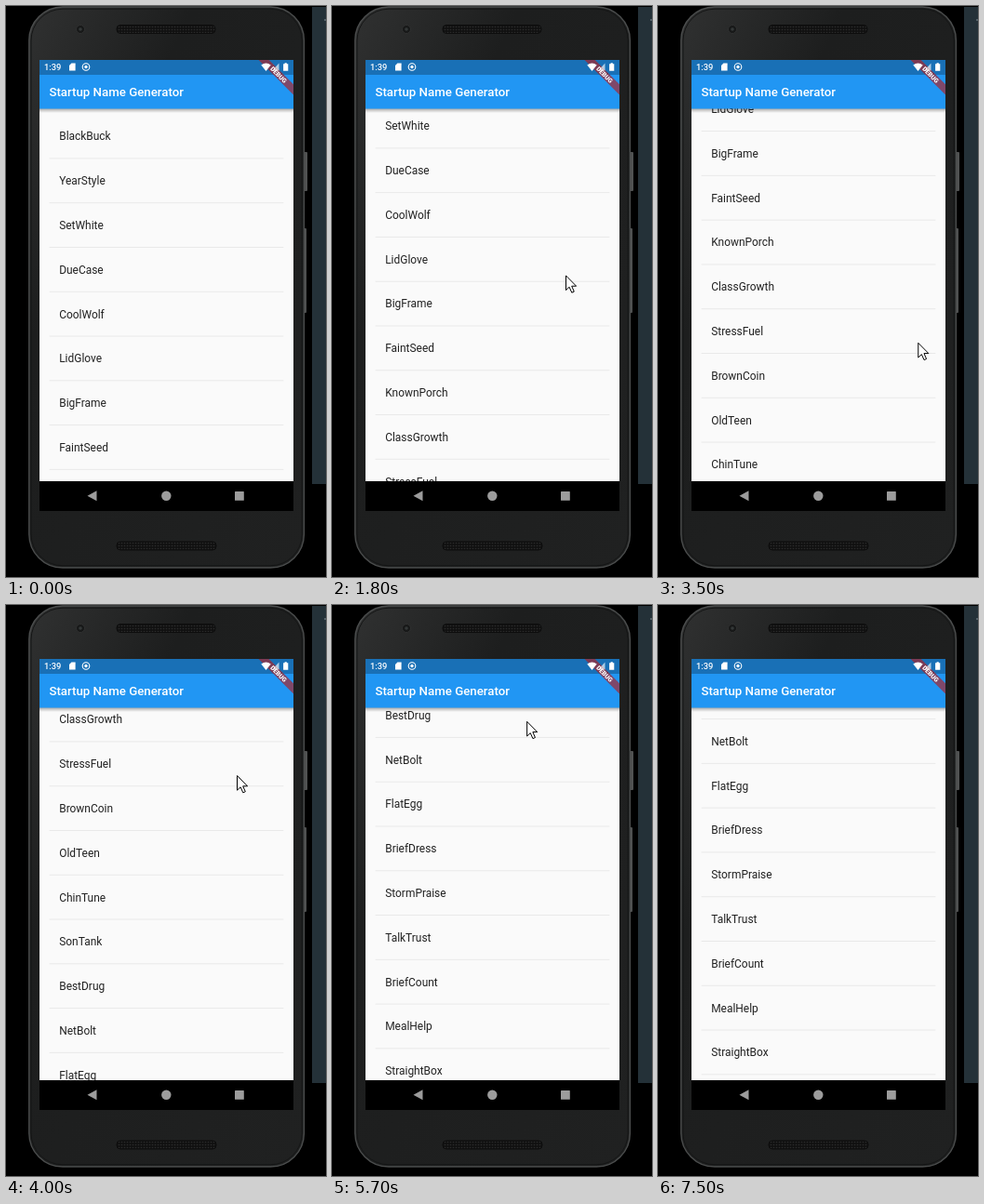
Animation of 344x614 px, one loop 7700 ms. Source, as an HTML page:

```html
<!DOCTYPE html>
<html lang="en">
<head>
<meta charset="utf-8">
<style>
html, body { margin: 0; width: 100%; height: 100%; overflow: hidden; background: #000; }
svg { display: block; font-family: Roboto, sans-serif; }
</style>
</head>
<body>
<svg width="344" height="614" viewBox="0 0 344 614">
  <defs>
    <linearGradient id="shell" x2="1" y2="1">
      <stop offset="0" stop-color="#303131"/>
      <stop offset=".3" stop-color="#1d1e1e"/>
      <stop offset="1" stop-color="#202121"/>
    </linearGradient>
    <linearGradient id="shade" x2="0" y2="1">
      <stop offset="0" stop-opacity=".34"/>
      <stop offset="1" stop-opacity="0"/>
    </linearGradient>
    <pattern id="mesh" width="3" height="3" patternUnits="userSpaceOnUse">
      <rect width="3" height="3" fill="#111"/>
      <circle cx="1.5" cy="1.5" r=".8" fill="#2b2b2b"/>
    </pattern>
    <clipPath id="screen"><path d="M36 58H309V543H36z"/></clipPath>
    <clipPath id="body"><path d="M36 110H309V511H36z"/></clipPath>
  </defs>

  <path d="M329 1H344V514H329z" fill="#243138"/>
  <path d="M342 15h2" stroke="#87939a"/>

  <g fill="#505252">
    <rect x="319" y="157" width="5" height="42" rx="1"/>
    <rect x="319" y="239" width="4" height="91" rx="1"/>
  </g>
  <rect x="24.8" y="1" width="295.6" height="603" rx="36" fill="url(#shell)" stroke="#4b4d4d" stroke-width="1.4"/>
  <rect x="27" y="3.2" width="291.2" height="598.6" rx="34" fill="none" stroke="#151616"/>
  <g fill="url(#mesh)" stroke="#0d0d0d">
    <rect x="119" y="20.5" width="106" height="9" rx="4"/>
    <rect x="119" y="576" width="107" height="9" rx="4"/>
  </g>
  <circle cx="80" cy="25" r="4.5" fill="#171818" stroke="#303131"/>
  <circle cx="80" cy="25" r="1.8" fill="#343838"/>

  <path d="M36 58H309V543H36z"/>
  <path d="M36 110H309V511H36z" fill="#fafafa"/>
  <g clip-path="url(#body)"><g id="list" font-size="11.95" fill="#212121"></g></g>

  <path d="M36 110H309V115H36z" fill="url(#shade)"/>
  <path d="M36 58H309V110.4H36z" fill="#2196f3"/>
  <path d="M36 58H309V74H36z" fill="#1970b6"/>
  <text x="46.4" y="97.4" font-size="13.27" font-weight="500" fill="#fff">Startup Name Generator</text>

  <g clip-path="url(#screen)">
    <g transform="translate(309 58) rotate(45)">
      <path d="M-40 18.6H40V26.5H-40z" fill="#b71c1c" fill-opacity=".63"/>
      <text y="25" font-size="6.77" font-weight="900" fill="#fff" text-anchor="middle">DEBUG</text>
    </g>
  </g>

  <g fill="#fff">
    <text x="41" y="69.2" font-size="9.3" font-weight="500">1:39</text>
    <path d="M70.4 61.5H74.6V69.5H68V64z"/>
    <circle cx="86" cy="65.5" r="3.8" fill="none" stroke="#fff" stroke-width="1.1"/>
    <circle cx="86" cy="65.5" r="1.7"/>
    <path d="M274.3 63.6Q279.5 59.6 284.7 63.6L279.5 70z"/>
    <path d="M293.5 61.5V69.5H286z" fill-opacity=".65"/>
    <path d="M299.6 61.2h2.2v1h1.5V69.7H298.1V62.2h1.5z"/>
  </g>

  <g fill="#9c9c9c">
    <path d="M87.5 526.8L97.5 521.3V532.3z"/>
    <circle cx="172.3" cy="526.8" r="5.2"/>
    <rect x="246" y="522" width="9.8" height="9.8" rx=".6"/>
  </g>

  <path id="cursor" d="M.5.5V16.2L4.1 12.8L6.8 18.8L9.3 17.7L6.7 11.8H11.6z" fill="#fff" stroke="#000" stroke-linejoin="round"/>
</svg>

<script>
const LOOP = 7700, STEP = 100, ROW = 47.78, FIRST = 140;
const names = ("BlackBuck YearStyle SetWhite DueCase CoolWolf LidGlove BigFrame FaintSeed KnownPorch " +
  "ClassGrowth StressFuel BrownCoin OldTeen ChinTune SonTank BestDrug NetBolt FlatEgg BriefDress " +
  "StormPraise TalkTrust BriefCount MealHelp StraightBox").split(" ");

// time, pointer x, pointer y, scroll offset
const keys = [
  [1100, 306, 430, 0],
  [1500, 241, 396, 0],
  [2120, 262, 172, 224],
  [3180, 287, 406, 224],
  [3300, 287, 406, 224],
  [4000, 248, 183, 447],
  [5150, 226, 416, 447],
  [5800, 208, 105, 758],
  [5900, 208, 105, 758],
  [6200, 204, 114, 758],
  [6400, 206, 80, 758]
];

const list = document.getElementById("list");
const cursor = document.getElementById("cursor");

list.innerHTML = names.map((name, i) => {
  const y = FIRST + i * ROW;
  return `<text x="57.2" y="${y + 4.4}">${name}</text>` +
    `<path d="M46.6 ${y + 23.9}H298.4" stroke="#000" stroke-opacity=".12" stroke-width=".6"/>`;
}).join("");

function poseAt(t) {
  const next = keys.findIndex(k => k[0] > t);
  if (next < 0) return keys.at(-1);
  if (next === 0) return keys[0];
  const a = keys[next - 1], b = keys[next];
  const p = (t - a[0]) / (b[0] - a[0]);
  const eased = p * p * (3 - 2 * p);
  return a.map((v, i) => v + (b[i] - v) * eased);
}

function draw(now) {
  const t = Math.floor(now % LOOP / STEP) * STEP;
  const [, x, y, scroll] = poseAt(t);
  list.setAttribute("transform", `translate(0 ${-scroll})`);
  cursor.setAttribute("transform", `translate(${x} ${y})`);
  cursor.style.display = t >= keys[0][0] && t < keys.at(-1)[0] ? "" : "none";
  requestAnimationFrame(draw);
}
draw(performance.now());
</script>
</body>
</html>
```
